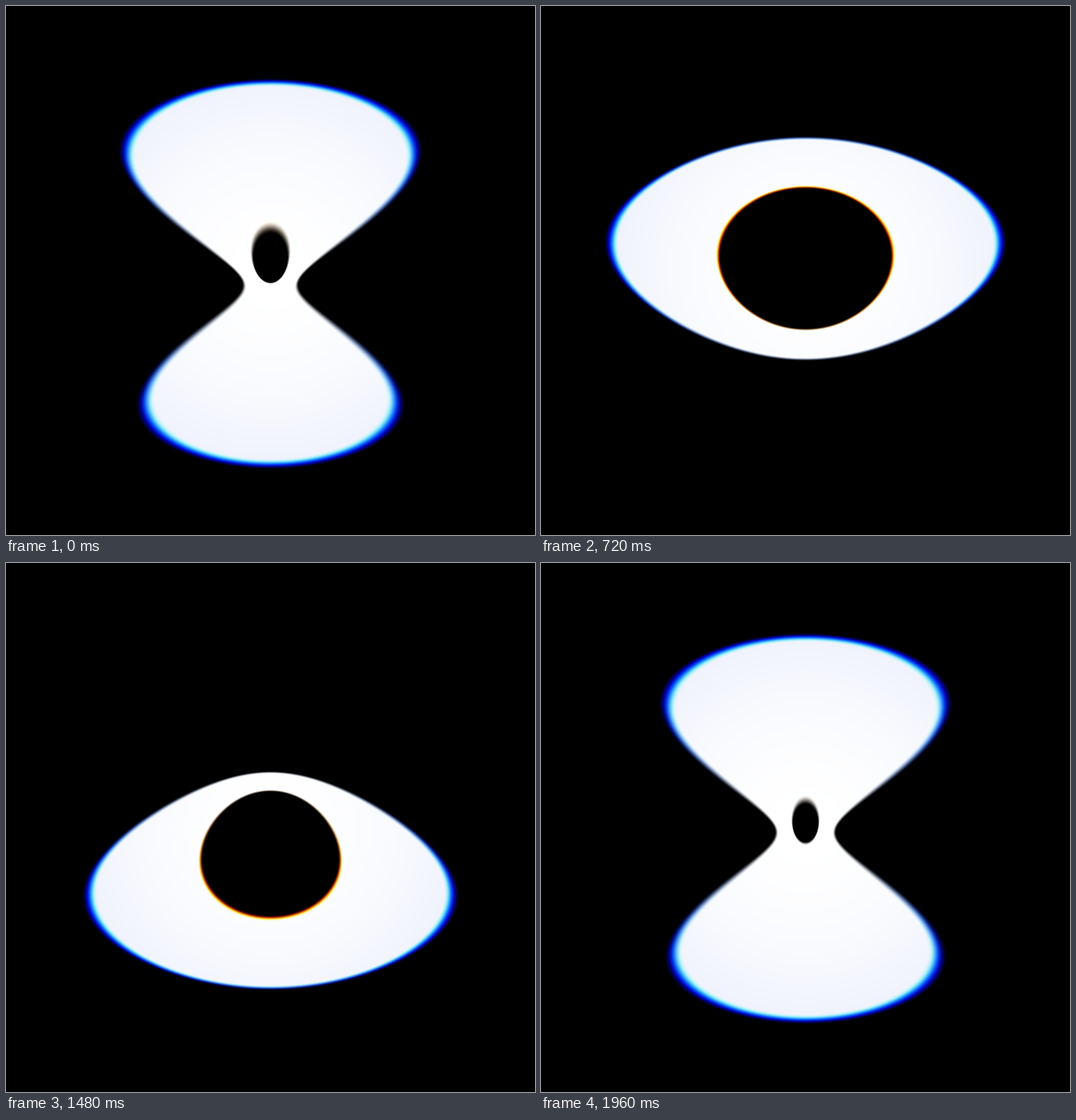
Animation of 600 by 600 pixels, one loop 2 s. Source, as an HTML page with a canvas:

```html
<!DOCTYPE html>
<html lang="en">
<head>
<meta charset="utf-8">
<title>Pulsing ring</title>
<style>
  html, body { margin: 0; width: 100%; height: 100%; overflow: hidden; background: #000; }
  canvas { display: block; width: 100vw; height: 100vh; }
</style>
</head>
<body>
<canvas id="stage" width="600" height="600"></canvas>
<script>
const SIZE = 600, MID = 300, LOOP = 2000, STEP = 40;
const REACH = 234;      // nothing glows beyond this radius
const CENTRED = 940;    // time at which the eye sits in the middle
const RAD = Math.PI / 180;

const ctx = document.getElementById('stage').getContext('2d');
const image = ctx.createImageData(SIZE, SIZE);
const data = image.data;
for (let i = 3; i < data.length; i += 4) data[i] = 255;

// Shift of the outer rim, shift of the hole's rim and inner tint: red, green, blue
const CHANNELS = [
  { rim: -0.050, hole: -0.025, tint: 0.060 },
  { rim: -0.025, hole: 0.000, tint: 0.047 },
  { rim: 0.020, hole: 0.030, tint: 0.014 }
];

function smooth(x) {
  if (x <= 0) return 0;
  if (x >= 1) return 1;
  return x * x * (3 - 2 * x);
}

// 0 to 1 across a band of half width soft around zero
function ramp(x, soft) {
  return smooth(0.5 + x / (2 * soft));
}

function put(col, row, k, value) {
  data[(row * SIZE + col) * 4 + k] = value;
}

function draw(time) {
  const phase = (time - CENTRED) / LOOP * 360;
  for (let row = MID - REACH; row < MID + REACH; row++) {
    const y = row + 0.5 - MID;
    for (let col = MID; col < MID + REACH; col++) {
      const x = col + 0.5 - MID;
      const q = x * x + y * y;
      const bend = 0.895 + 0.065 * q / 44100;
      // A wave running down the stage sets both radii of the ring
      const wave = 1 + Math.cos((bend * y - phase) * RAD);
      const outer = q / (1100 + 27000 * wave - 1100 * wave * wave);
      const inner = q / (200 + 5200 * wave);
      const split = wave / 2;
      const calm = 1 - split;
      const soft = 0.04 + 0.085 * calm * calm;
      const far = Math.min(1, q / 45000);
      for (let k = 0; k < 3; k++) {
        const c = CHANNELS[k];
        let level = 0;
        if (q < REACH * REACH) {
          level = ramp(1 + c.rim * split - outer, soft)
                * ramp(inner - 1 - c.hole * split, soft)
                * (1 - c.tint * far);
        }
        const value = Math.round(level * 255);
        put(col, row, k, value);
        put(SIZE - 1 - col, row, k, value);
      }
    }
  }
  ctx.putImageData(image, 0, 0);
}

const start = performance.now();
let shown = -1;

function tick() {
  const elapsed = (performance.now() - start) % LOOP;
  const time = Math.floor(elapsed / STEP) * STEP;
  if (time !== shown) {
    shown = time;
    draw(time);
  }
  requestAnimationFrame(tick);
}
tick();
</script>
</body>
</html>
```
